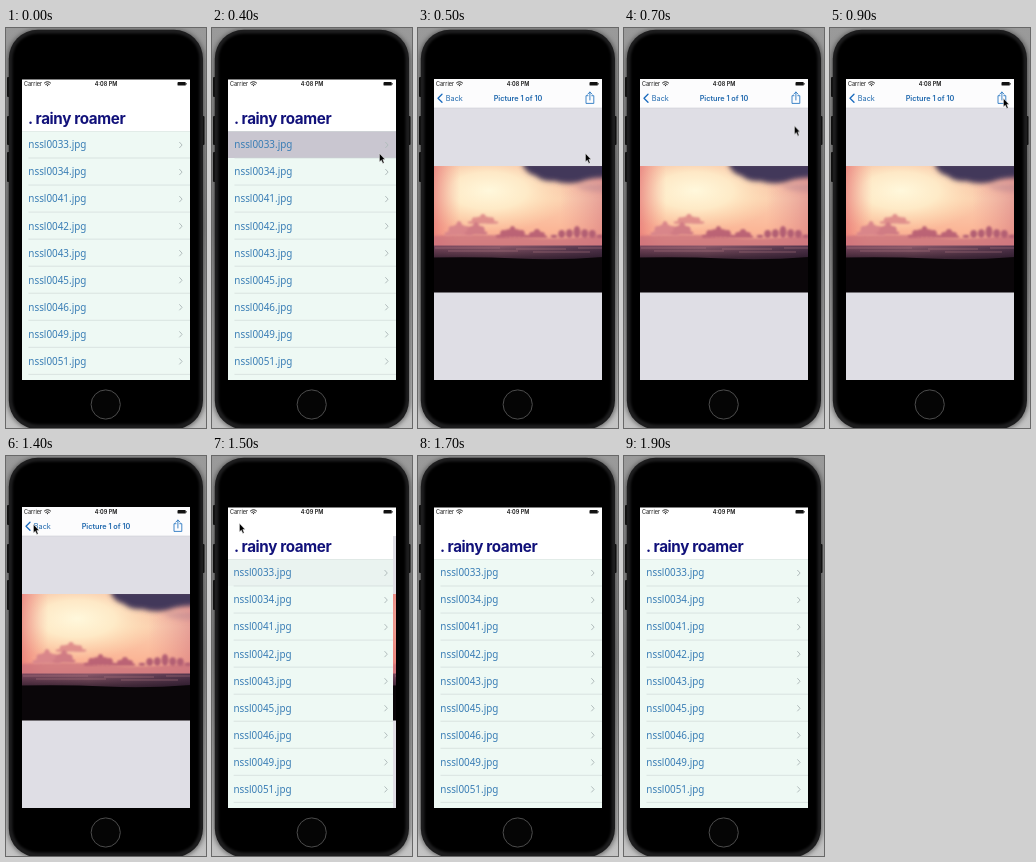
Animation of 200 by 400 pixels, one loop 2000 ms. Source, as an HTML page:

```html
<!DOCTYPE html>
<html lang="en">
<head>
<meta charset="utf-8">
<title>Picture list</title>
<style>
  html, body { margin: 0; width: 100%; height: 100%; overflow: hidden; background: #858585; }
  svg { display: block; width: 100vw; height: 100vh; }
  text { font-family: Inter, "Liberation Sans", sans-serif; }
  .anim { animation: 2s step-end infinite; }
  .status { font-size: 5.5px; fill: #111; }
  .title { font-size: 15.2px; font-weight: 700; letter-spacing: -.35px; fill: #11117a; }
  .row text { font-family: "Noto Sans", "Open Sans", sans-serif; font-size: 9.9px; fill: #397db5; }
  .nav { font-size: 7.3px; fill: #2069ae; }
  .line { fill: none; stroke-linecap: round; stroke-linejoin: round; }

  #list { animation-name: list; }
  #rows { animation-name: rows; }
  #highlight { animation-name: highlight; }
  #detail { animation-name: detail; }
  #bar { animation-name: bar; }
  #early { animation-name: early; }
  #late { animation-name: late; }
  #cursor { animation-name: cursor; }

  @keyframes list { 0%, 75%, 100% { visibility: visible; } 25% { visibility: hidden; } }
  @keyframes rows { 0%, 80%, 100% { transform: none; } 75% { transform: translateX(-.8px); } }
  @keyframes highlight {
    0%, 25%, 80%, 100% { opacity: 0; }
    20% { opacity: 1; }
    75% { opacity: .12; }
  }
  @keyframes detail {
    0%, 80%, 100% { visibility: hidden; transform: none; }
    25% { visibility: visible; transform: none; }
    75% { visibility: visible; transform: translateX(166px); }
  }
  @keyframes bar { 0%, 75%, 100% { visibility: hidden; } 25% { visibility: visible; } }
  @keyframes early { 0%, 100% { visibility: visible; } 65% { visibility: hidden; } }
  @keyframes late { 0%, 100% { visibility: hidden; } 65% { visibility: visible; } }
  @keyframes cursor {
    0% { transform: translate(172px, 130px); visibility: hidden; }
    15% { transform: translate(172px, 130px); visibility: visible; }
    20% { transform: translate(167px, 125px); visibility: visible; }
    25% { transform: translate(167px, 125px); visibility: visible; animation-timing-function: steps(4, end); }
    45% { transform: translate(173px, 70px); visibility: visible; animation-timing-function: steps(3, end); }
    60% { transform: translate(164px, 71px); visibility: visible; animation-timing-function: steps(2, end); }
    70% { transform: translate(27px, 68px); visibility: visible; }
    75% { transform: translate(27px, 67px); visibility: visible; }
    85%, 100% { transform: translate(27px, 67px); visibility: hidden; }
  }
</style>
</head>
<body>
<svg viewBox="0 0 200 400" preserveAspectRatio="none">
  <defs>
    <clipPath id="screen"><rect x="16" y="51.6" width="168" height="299.6"/></clipPath>
    <clipPath id="frame"><rect x="15" y="138" width="170" height="126.5"/></clipPath>
    <linearGradient id="backdrop" x2="0" y2="1">
      <stop offset="0" stop-color="#9a9a9a"/>
      <stop offset=".5" stop-color="#8a8a8a"/>
      <stop offset="1" stop-color="#c4c4c4"/>
    </linearGradient>
    <linearGradient id="sky" x2="0" y2="1">
      <stop offset="0" stop-color="#f6b9a4"/>
      <stop offset=".4" stop-color="#fbcfb0"/>
      <stop offset=".8" stop-color="#fbb596"/>
      <stop offset="1" stop-color="#ee9d8c"/>
    </linearGradient>
    <radialGradient id="glow" cx=".33" cy=".3" r=".5">
      <stop offset="0" stop-color="#fff8dc"/>
      <stop offset=".45" stop-color="#fff0cc" stop-opacity=".85"/>
      <stop offset="1" stop-color="#ffe0b0" stop-opacity="0"/>
    </radialGradient>
    <linearGradient id="dusk">
      <stop offset="0" stop-color="#e0636c" stop-opacity=".6"/>
      <stop offset=".16" stop-color="#f08a80" stop-opacity="0"/>
      <stop offset=".75" stop-color="#e08088" stop-opacity="0"/>
      <stop offset="1" stop-color="#d0707f" stop-opacity=".5"/>
    </linearGradient>
    <linearGradient id="sea">
      <stop offset="0" stop-color="#7d4a60"/>
      <stop offset=".4" stop-color="#8d5a6c"/>
      <stop offset="1" stop-color="#55364f"/>
    </linearGradient>
    <linearGradient id="depth" x2="0" y2="1">
      <stop offset="0" stop-color="#1a0f1c" stop-opacity="0"/>
      <stop offset="1" stop-color="#1a0f1c" stop-opacity=".75"/>
    </linearGradient>
    <filter id="soft" x="-20%" y="-50%" width="140%" height="200%"><feGaussianBlur stdDeviation=".9"/></filter>
    <filter id="hazy" x="-20%" y="-50%" width="140%" height="200%"><feGaussianBlur stdDeviation="2.4"/></filter>
  </defs>

  <!-- phone -->
  <rect width="200" height="400" fill="url(#backdrop)"/>
  <rect x="2" y="2" width="196" height="400" rx="29" opacity=".5" filter="url(#hazy)"/>
  <g fill="#101010">
    <rect x="1" y="49" width="4" height="20" rx="1"/>
    <rect x="1" y="88" width="4" height="29" rx="1"/>
    <rect x="1" y="124" width="4" height="30" rx="1"/>
    <rect x="195" y="88" width="3.5" height="29" rx="1"/>
  </g>
  <rect x="2.8" y="1.8" width="194.2" height="399.5" rx="29" fill="#1d1d1e"/>
  <rect x="6.5" y="5.5" width="187" height="391" rx="25" fill="#050505" filter="url(#soft)"/>
  <circle cx="99.7" cy="376.5" r="14.6" fill="#050505" stroke="#4c4c4c"/>

  <g clip-path="url(#screen)">
    <rect x="15" y="51" width="170" height="301" fill="#fff"/>

    <g id="list" class="anim">
      <g id="rows" class="anim">
        <rect x="15" y="103" width="171" height="249" fill="#eef9f4"/>
        <rect id="highlight" class="anim" x="15" y="103" width="171" height="27" fill="#c9c6d0"/>
        <path d="M15 103.3H186" stroke="#d5dddb" stroke-width=".6"/>
      </g>
      <text class="title" x="22" y="96.2">. rainy roamer</text>
    </g>

    <g id="detail" class="anim">
      <rect x="15" y="80" width="170" height="272" fill="#dfdee5"/>
      <g clip-path="url(#frame)">
        <g id="air">
          <rect x="15" y="138" width="170" height="82" fill="url(#sky)"/>
          <rect x="15" y="138" width="170" height="82" fill="url(#glow)"/>
          <rect x="15" y="138" width="170" height="82" fill="url(#dusk)"/>
        </g>
        <g filter="url(#hazy)" fill="#43385a">
          <path d="M104 134H192V150Q176 149 162 154Q148 157 136 153Q124 154 118 148Q106 145 104 134Z"/>
          <path d="M156 158Q174 154 192 157V163Q172 166 156 158Z" fill="#b98791" opacity=".5"/>
        </g>
        <path d="M15 208Q60 205 100 209T185 207V220H15Z" fill="#c9717c" opacity=".75" filter="url(#soft)"/>
        <g id="clouds" filter="url(#soft)"></g>
        <rect x="15" y="217.5" width="170" height="15" fill="url(#sea)"/>
        <rect x="15" y="217.5" width="170" height="15" fill="url(#depth)"/>
        <path d="M17 220H82M98 221H148M160 220H184M30 223H100M115 224H172" stroke="#b67c86" stroke-width=".7" opacity=".7"/>
        <path d="M15 229.5Q60 228.5 100 230.5T185 229V265H15Z" fill="#0a0609"/>
      </g>
    </g>

    <g id="bar" class="anim">
      <rect x="15" y="51" width="170" height="29" fill="#fcfcfd"/>
      <path d="M15 80H185" stroke="#cfcfd3" stroke-width=".6"/>
      <path class="line" d="M24 66.2L20 70.2L24 74.2" stroke="#1769bd" stroke-width="1.3"/>
      <text class="nav" x="27.8" y="72.8">Back</text>
      <text class="nav" x="100" y="72.8" text-anchor="middle" font-weight="600">Picture 1 of 10</text>
      <path class="line" d="M170 67.7H168V75.4H175.8V67.7H173.8M171.9 72V64.1M169.7 66.2L171.9 64L174.1 66.2" stroke="#2b79c2" stroke-width=".9"/>
    </g>

    <!-- status bar -->
    <g class="status">
      <text x="18" y="57.8">Carrier</text>
      <g id="early" class="anim"><text x="100" y="57.8" text-anchor="middle" font-weight="600">4:08 PM</text></g>
      <g id="late" class="anim"><text x="100" y="57.8" text-anchor="middle" font-weight="600">4:09 PM</text></g>
      <path class="line" d="M38.4 55Q41.5 52.2 44.6 55M39.7 56.4Q41.5 54.8 43.3 56.4" stroke="#111" stroke-width=".9"/>
      <circle cx="41.5" cy="57.6" r=".7"/>
      <rect x="171.5" y="54" width="8.3" height="3.6" rx=".9"/>
      <rect x="180.1" y="55.1" width=".7" height="1.4" rx=".3"/>
    </g>
  </g>

  <g id="cursor" class="anim">
    <path d="M.4 .3V8.9L2.3 7.2L3.8 10.4L5.2 9.7L3.8 6.6H6.2Z" fill="#000" stroke="#fff" stroke-width=".5"/>
  </g>
</svg>
<script>
  const append = (id, markup) => document.getElementById(id).insertAdjacentHTML("beforeend", markup);

  const row = (number, i) => {
    const y = 103 + 27.05 * i;
    return `<g class="row" transform="translate(0 ${y})">
      <text x="22.3" y="17.4">nssl00${number}.jpg</text>
      <path class="line" d="M173.6 11.3L176.1 14L173.6 16.7" stroke="#b1bcbc" stroke-width="1"/>
      <path d="M22.5 27H186" stroke="#cbd6d3" stroke-width=".6"/>
    </g>`;
  };
  append("rows", [33, 34, 41, 42, 43, 45, 46, 49, 51].map(row).join(""));

  // Each cloud bank: left edge, right edge, base height, tallest rise, colour.
  const banks = [
    [30, 52, 208, 15, "#d9868a"], [53, 77, 196, 10, "#e0908c"], [50, 66, 207, 13, "#d07c84"],
    [81, 108, 210, 12, "#bb6475"], [112, 126, 210, 9, "#bb6475"], [136, 182, 210, 12, "#b25f73"],
  ];
  const puffs = ([left, right, base, rise, colour]) => Array.from({ length: 7 }, (_, i) => {
    const u = i / 6;
    const height = rise * (.35 + .65 * Math.sin(Math.PI * u)) * (i % 2 ? 1 : .8);
    return `<ellipse cx="${left + (right - left) * u}" cy="${base - height / 2}" rx="3.4" ry="${height / 2}" fill="${colour}"/>`;
  }).join("");
  append("clouds", banks.map(puffs).join(""));
</script>
</body>
</html>
```
